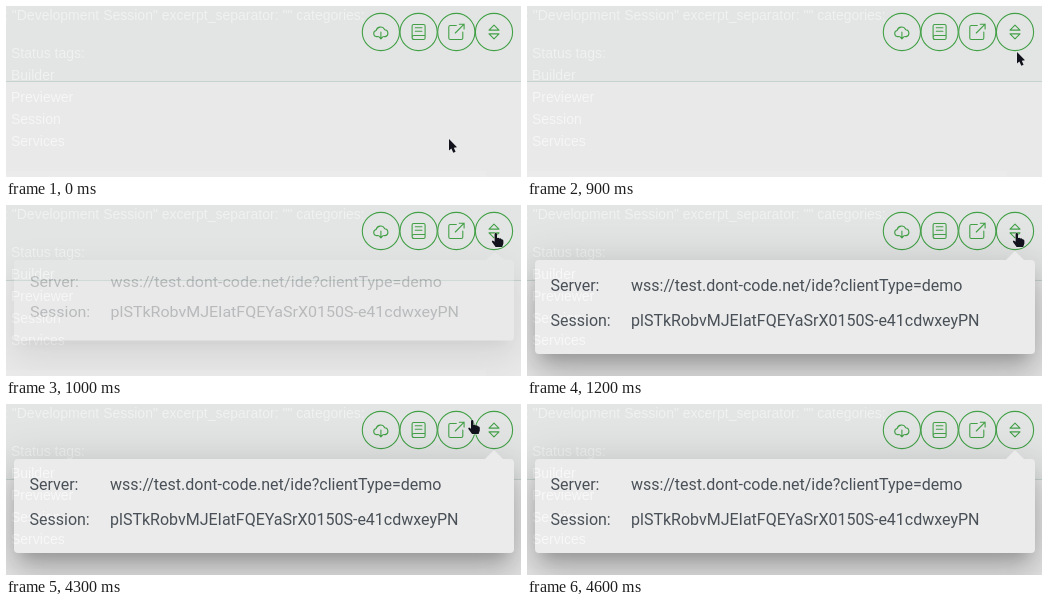
Animation of 515x171 px, one loop 5.3 s. Source, as an HTML page:

```html
<!DOCTYPE html>
<html lang="en">
<head>
<meta charset="utf-8">
<title>Connection panel</title>
<style>
  html, body { margin: 0; width: 100%; height: 100%; overflow: hidden; background: #e9e9e9; }
  #stage { position: relative; width: 515px; height: 171px; overflow: hidden; background: #e9e9e9; }
  #bar { position: absolute; left: 0; top: 0; width: 515px; height: 75px;
    background: linear-gradient(#e3e5e4, #e2e5e4); border-bottom: 1px solid #c6d2cc; }
  #foot { position: absolute; left: 0; top: 165px; width: 480px; height: 6px; background: #ebebeb; }
  svg { position: absolute; left: 0; top: 0; width: 515px; height: 171px; overflow: hidden; }
  #panel { position: absolute; left: 7.5px; top: 55px; width: 500px; height: 94px; border-radius: 4px;
    background: #ebebeb; color: #495057; transform-origin: 50% 0;
    font: 16px/20px Roboto, sans-serif; white-space: pre;
    box-shadow: 0 11px 15px -7px rgba(0,0,0,.2), 0 24px 38px 3px rgba(0,0,0,.14), 0 9px 46px 8px rgba(0,0,0,.12); }
  #panel::before { content: ""; position: absolute; left: 470.5px; top: -9px;
    border: solid transparent; border-width: 0 10px 10px; border-bottom-color: #ebebeb; }
  #panel span { position: absolute; }
  .key { left: 16px; }
  .value { left: 96.5px; }
  .row1 { top: 16px; }
  .row2 { top: 51px; }
  #ghost { font: 14px "Liberation Sans", Arial, sans-serif; fill: #0d0d0d; white-space: pre;
    mix-blend-mode: plus-lighter; }
  #buttons { fill: none; stroke: #43a047; stroke-width: 1.1; stroke-linecap: round; stroke-linejoin: round; }
  #pointers path { fill: #12121c; stroke: #eee; stroke-width: .7; stroke-linejoin: round; paint-order: stroke; }
</style>
</head>
<body>
<div id="stage">
  <div id="bar"></div>
  <div id="foot"></div>
  <svg id="buttons" viewBox="0 0 515 171">
    <g transform="translate(374.9 26)">
      <circle r="18.6"/>
      <path d="M-3.2 4.6H-4.4A3.1 3.1 0 0 1-4.8-1.5A4.6 4.6 0 0 1 3.8-2.3A3.5 3.5 0 0 1 4.3 4.6H3.2M0 0V6.8M-2.2 4.7L0 6.8L2.2 4.7"/>
    </g>
    <g transform="translate(412.6 26)">
      <circle r="18.6"/>
      <path d="M-5-7.5H5Q6.5-7.5 6.5-6V6Q6.5 7.5 5 7.5H-4.5Q-6.5 7.5-6.5 5.5V-6Q-6.5-7.5-5-7.5ZM-6.5 5.5Q-6.5 3.5-4.5 3.5H6.5M-3.3-4.2H3.3M-3.3-.8H3.3"/>
    </g>
    <g transform="translate(450.3 26)">
      <circle r="18.6"/>
      <path d="M0-6.5H-6Q-7.5-6.5-7.5-5V6Q-7.5 7.5-6 7.5H5Q6.5 7.5 6.5 6V0M-1 1L7.8-7.8M3-7.8H7.8V-3"/>
    </g>
    <g transform="translate(488 26)">
      <circle r="18.6"/>
      <path d="M-5-1.9L0-6.9L5-1.9ZM-5 1.9L0 6.9L5 1.9Z"/>
    </g>
  </svg>
  <div id="panel">
    <span class="key row1">Server:</span><span class="value row1">wss://test.dont-code.net/ide?clientType=demo</span>
    <span class="key row2">Session:</span><span class="value row2">plSTkRobvMJEIatFQEYaSrX0150S-e41cdwxeyPN</span>
  </div>
  <svg id="ghost" viewBox="0 0 515 171">
    <text x="-2" y="14">: "Development Session" excerpt_separator: "" categories:</text>
    <text x="5" y="52">Status tags:</text>
    <text x="5" y="74">Builder</text>
    <text x="5" y="96">Previewer</text>
    <text x="5" y="118">Session</text>
    <text x="5" y="140">Services</text>
  </svg>
  <svg id="pointers" viewBox="0 0 515 171">
    <path id="arrow" d="M0 0V11.5L2.4 9.6L4.3 13.8L6.6 12.7L4.8 8.7L8 8.3Z"/>
    <path id="hand" d="M3 1.2Q3 0 4.2 0T5.4 1.2V5Q7.3 4.5 7.7 5.5Q9.3 5 9.8 6.2Q11.8 6 11.8 7.8V10.5L10.6 14H4L.4 9Q-.2 7.6 1.2 7.4L3 8.7Z"/>
  </svg>
</div>
<script>
  const LOOP = 5300;
  // start ms, pointer, x, y
  const POINTER = [
    [0, "arrow", 443, 133],
    [600, "arrow", 449, 122],
    [700, "arrow", 466, 93],
    [800, "arrow", 482, 64],
    [900, "arrow", 490, 46],
    [1000, "hand", 485.6, 28],
    [4300, "hand", 462, 16],
    [4600, "none", 0, 0]
  ];
  // start ms, opacity, vertical scale
  const PANEL = [
    [0, 0, .8],
    [1000, .3, .857],
    [1100, .98, 1],
    [1200, 1, 1]
  ];
  const el = id => document.getElementById(id);
  const pointers = { arrow: el("arrow"), hand: el("hand") };
  const panel = el("panel");
  const at = (steps, t) => steps.findLast(step => step[0] <= t);

  function draw(t) {
    const [, kind, x, y] = at(POINTER, t);
    for (const name in pointers) {
      pointers[name].style.display = name === kind ? "" : "none";
      pointers[name].setAttribute("transform", `translate(${x} ${y})`);
    }
    const [, opacity, scale] = at(PANEL, t);
    panel.style.opacity = opacity;
    panel.style.transform = scale === 1 ? "none" : `scaleY(${scale})`;
  }

  const start = performance.now();
  function tick() {
    draw((performance.now() - start) % LOOP);
    requestAnimationFrame(tick);
  }
  tick();
</script>
</body>
</html>
```
